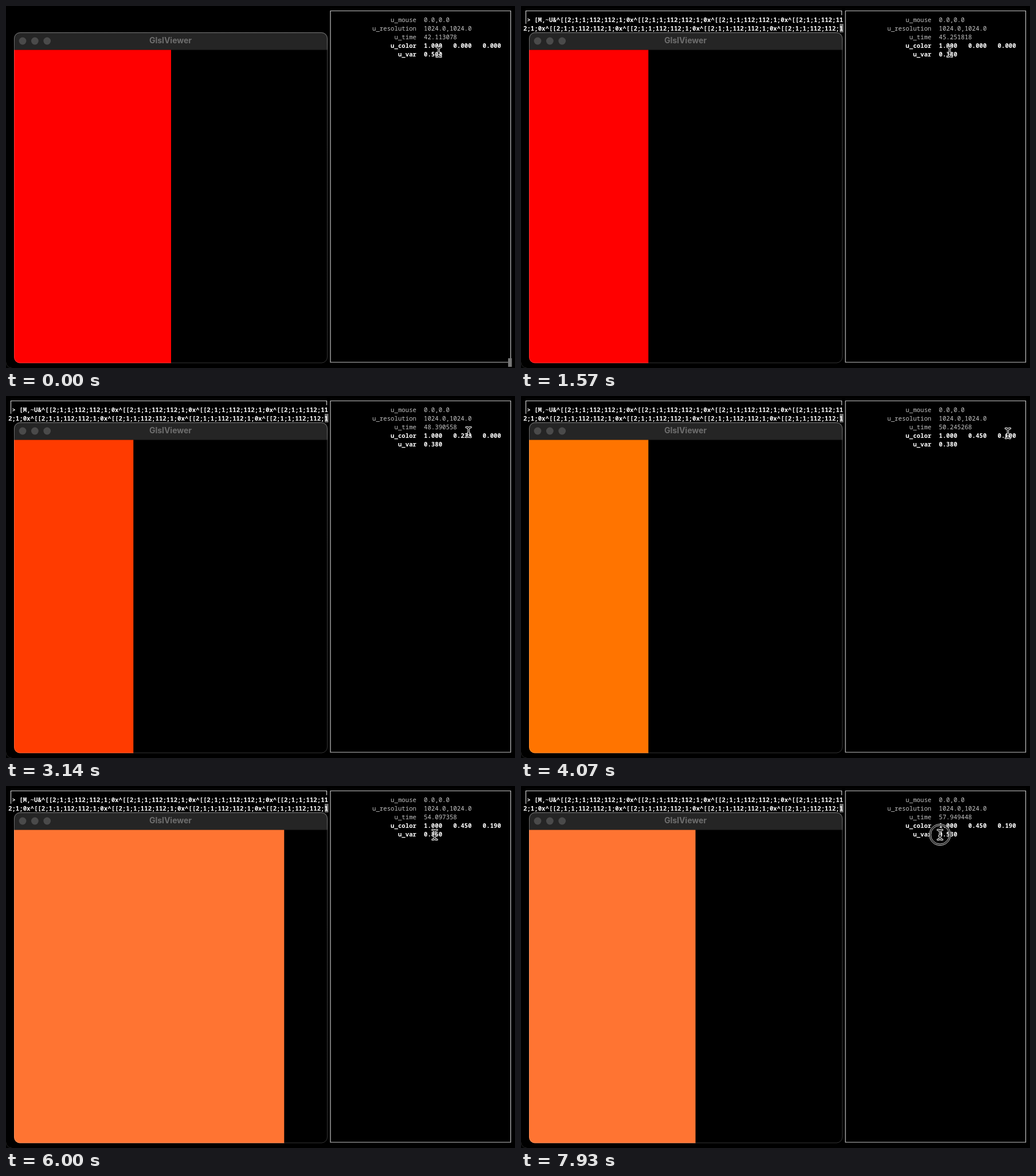
Write an HTML page with a canvas that moves like this. It is 888 px wide and 631 px high and loops after 8000 ms.

```html
<!DOCTYPE html>
<html lang="en">
<head>
<meta charset="utf-8">
<title>GlslViewer uniforms</title>
<style>
  html, body { margin: 0; width: 100%; height: 100%; overflow: hidden; background: #000; }
  canvas { display: block; }
</style>
</head>
<body>
<canvas id="stage" width="888" height="631"></canvas>
<script>
const ctx = document.getElementById('stage').getContext('2d');
const LOOP = 8000, TICKS_PER_SECOND = 14;
const MONO = '10.7px "Noto Sans Mono", "DejaVu Sans Mono", monospace';
const WIN = { x: 14, y: 46, w: 547, h: 576.5, bar: 30.5, radius: 10 };
const MOUSE_CODE = '^[[2;1;1;112;112;1;0x';

const between = (tick, from, to) => tick >= from && tick < to;
const ramp = (tick, from, to) => Math.min(1, Math.max(0, (tick - from) / (to - from)));
const smooth = p => p * p * (3 - 2 * p);
const hundredths = value => Math.round(value * 100) / 100;

// The last drag swings one and a quarter turns and stops at the middle.
const swing = tick => Math.cos(2 * Math.PI * 1.25 * ramp(tick, 84, 104));

function uniformsAt(tick) {
  const dragged = .5 - .12 * ramp(tick, 4, 14) + .48 * ramp(tick, 73, 84);
  return {
    time: 42.113078 + tick * .14267,
    split: hundredths(dragged - .33 * (1 - swing(tick))),
    green: hundredths(.45 * ramp(tick, 37, 51)),
    blue: hundredths(.19 * ramp(tick, 58, 66))
  };
}

function pointerAt(tick) {
  // Each glide: start, end, horizontal shift, vertical shift.
  const glides = [[0, 10, -25, 5], [17, 33, 77, -22], [50, 57, 42.5, 2],
    [66, 71, -84.5, 85], [72, 76, -17, -65]];
  let x = 755 - 17 * (1 - swing(tick)), y = 80;
  for (const [from, to, dx, dy] of glides) {
    const progress = smooth(ramp(tick, from, to));
    x += dx * progress;
    y += dy * progress;
  }
  return { x, y };
}

function text(str, x, y, color, { bold = false, align = 'left', font = MONO } = {}) {
  ctx.font = (bold ? 'bold ' : '') + font;
  ctx.textAlign = align;
  ctx.fillStyle = color;
  ctx.fillText(str, x, y);
}

function rect(x, y, w, h, color) {
  ctx.fillStyle = color;
  ctx.fillRect(x, y, w, h);
}

function circle(x, y, r) {
  ctx.beginPath();
  ctx.arc(x, y, r, 0, Math.PI * 2);
}

function stroke(color, width) {
  ctx.strokeStyle = color;
  ctx.lineWidth = width;
  ctx.stroke();
}

const drawCaret = (x, y) => rect(x, y, 6.5, 15, '#777');

function drawConsole() {
  ctx.beginPath();
  ctx.moveTo(8.5, 31);
  ctx.lineTo(8.5, 8.5);
  ctx.lineTo(559.5, 8.5);
  ctx.lineTo(559.5, 16);
  stroke('#d0d0d0', 1.2);
  const first = '> [M,~U&' + MOUSE_CODE.repeat(4);
  const second = '2;1;0x' + MOUSE_CODE.repeat(4);
  text(first.slice(0, 86), 10.5, 28, '#fff', { bold: true });
  drawCaret(556, 31);
  text(second.slice(0, 87), 4, 43, '#fff', { bold: true });
}

function drawUniforms(tick, { time, split, green, blue }) {
  ctx.beginPath();
  ctx.rect(566, 8.5, 314.5, 612.5);
  stroke('#c4c4c4', 1.2);
  const hot = (from, to) => between(tick, from, to) ? '#f44336' : '#fff';
  const rows = [
    ['u_mouse', ['0.0,0.0']],
    ['u_resolution', ['1024.0,1024.0']],
    ['u_time', [time.toFixed(6)]],
    ['u_color', ['1.000', green.toFixed(3), blue.toFixed(3)], ['#fff', hot(33, 37), '#fff']],
    ['u_var', [split.toFixed(3)], [hot(68, 73)]]
  ];
  rows.forEach(([label, values, colors], row) => {
    const y = 28 + row * 15, bold = Boolean(colors);
    text(label, 716, y, bold ? '#fff' : '#c0c0c0', { bold, align: 'right' });
    values.forEach((value, i) =>
      text(value, 729 + i * 51.3, y, bold ? colors[i] : '#c8c8c8', { bold }));
  });
}

function drawWindow({ split, green, blue }) {
  const { x, y, w, h, bar, radius } = WIN;
  ctx.save();
  ctx.beginPath();
  ctx.roundRect(x, y, w, h, radius);
  ctx.clip();
  rect(x, y, w, h, '#000');
  rect(x, y, w, bar, '#252525');
  rect(x, y + bar, (w + 1) * split, h, `rgb(255, ${green * 258}, ${blue * 264})`);
  ctx.restore();

  const edge = ctx.createLinearGradient(0, y, 0, y + h);
  edge.addColorStop(0, '#fff6');
  edge.addColorStop(.06, '#fff4');
  edge.addColorStop(1, '#fff3');
  ctx.beginPath();
  ctx.roundRect(x + .5, y + .5, w - 1, h - 1, radius);
  stroke(edge, 1);

  for (let i = 0; i < 3; i++) {
    circle(29 + i * 21.35, 61, 6.4);
    ctx.fillStyle = '#4a4a4a';
    ctx.fill();
  }
  text('GlslViewer', 287, 65.3, '#6e6e6e',
    { bold: true, align: 'center', font: '14px Inter, "Liberation Sans", sans-serif' });
}

function drawPointer({ x, y }, pressed) {
  if (pressed) {
    circle(x, y, 17.3);
    stroke('#222', 3);
    for (const r of [18.6, 16]) {
      circle(x, y, r);
      stroke('#d0d0d0', .9);
    }
  }
  ctx.save();
  ctx.translate(x, y);
  ctx.lineCap = 'round';
  ctx.beginPath();
  for (const side of [-1, 1]) {
    ctx.moveTo(-4, 8.5 * side);
    ctx.quadraticCurveTo(0, 8.5 * side, 0, 5 * side);
    ctx.quadraticCurveTo(0, 8.5 * side, 4, 8.5 * side);
  }
  ctx.moveTo(0, -5);
  ctx.lineTo(0, 5);
  ctx.moveTo(-1.5, 2);
  ctx.lineTo(1.5, 2);
  stroke('#fff', 3.4);
  stroke('#000', 1.3);
  ctx.restore();
}

function draw(ms) {
  const tick = Math.floor((ms + 2) * TICKS_PER_SECOND / 1000);
  const uniforms = uniformsAt(tick);
  const cleared = between(tick, 10, 13);

  rect(0, 0, 888, 631, '#000');
  ctx.beginPath();
  ctx.arc(10, 621, 10, Math.PI / 2, Math.PI);
  stroke('#222', 1);

  if (!cleared) drawUniforms(tick, uniforms);
  if (cleared) drawCaret(556, 31);
  else if (tick < 10) drawCaret(876, 614);
  else drawConsole();
  drawWindow(uniforms);
  drawPointer(pointerAt(tick), tick >= 109);
}

function frame(now) {
  draw(now % LOOP);
  requestAnimationFrame(frame);
}
draw(0);
requestAnimationFrame(frame);
</script>
</body>
</html>
```
